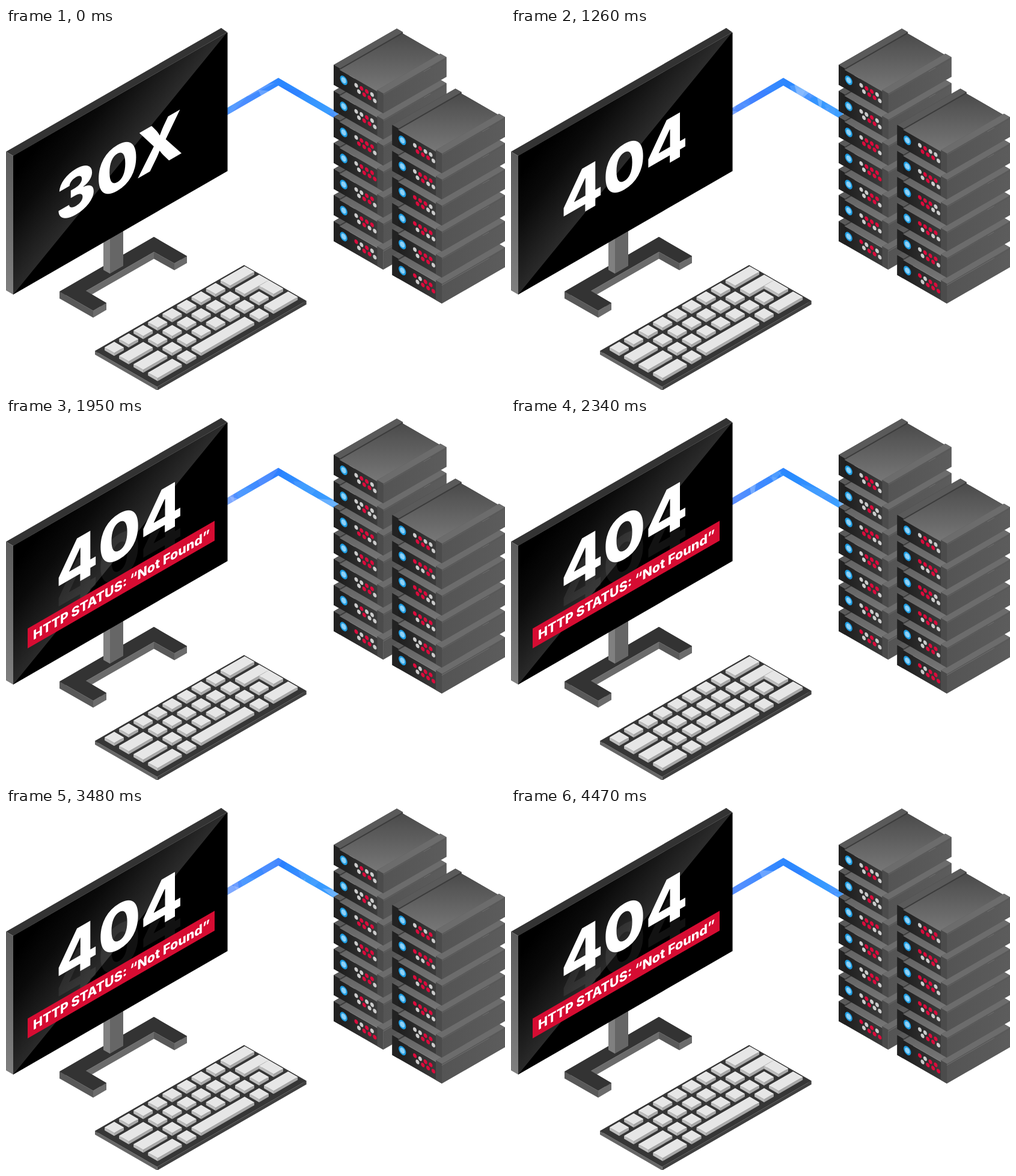
An HTML page that plays this animation: 830x603 px, repeating every 4.5 s.

```html
<!DOCTYPE html>
<html lang="en">
<head>
<meta charset="utf-8">
<title>404 Not Found</title>
<style>
  html, body { margin: 0; width: 100%; height: 100%; overflow: hidden; background: #fff; }
  svg { display: block; width: 830px; height: 603px; }
  text { font-family: Inter, "Open Sans", sans-serif; fill: #fff; }
  .digits { font-size: 102px; font-weight: 850; }
  .status { font-size: 21.4px; font-weight: 800; }
</style>
</head>
<body>
<svg viewBox="0 0 830 603">
  <defs>
    <linearGradient id="glare" gradientUnits="userSpaceOnUse" x1="90" y1="150" x2="190" y2="230">
      <stop stop-color="#000"/><stop offset=".35" stop-color="#0a0a0a"/><stop offset="1" stop-color="#2c2c2c"/>
    </linearGradient>
    <linearGradient id="edge" x2="0" y2="1"><stop stop-color="#5c5c5c"/><stop offset="1" stop-color="#808080"/></linearGradient>
    <linearGradient id="top" x2="0" y2="1"><stop stop-color="#484848"/><stop offset="1" stop-color="#7a7a7a"/></linearGradient>
    <linearGradient id="front"><stop stop-color="#191919"/><stop offset="1" stop-color="#404040"/></linearGradient>
    <linearGradient id="side"><stop stop-color="#545454"/><stop offset="1" stop-color="#5c5c5c"/></linearGradient>
    <linearGradient id="blue"><stop stop-color="#5a90ff"/><stop offset=".5" stop-color="#2a86ff"/><stop offset="1" stop-color="#3fa2ff"/></linearGradient>
    <clipPath id="cable"><path d="M368 133L453 83L556 143V156L453 96L368 145Z"/></clipPath>
    <clipPath id="wipe"><rect id="wipeBox" x="36" y="360" height="60"/></clipPath>
  </defs>

  <g clip-path="url(#cable)">
    <rect x="368" y="80" width="184" height="80" fill="url(#blue)"/>
    <g id="facets"></g>
  </g>
  <g id="scene"></g>
  <g transform="matrix(1 -.577 0 1 0 0)">
    <text id="ghost" class="digits" x="83" y="377">404</text>
    <text id="digits" class="digits" x="83"></text>
    <g clip-path="url(#wipe)">
      <rect x="36" y="371.5" width="311" height="33" fill="#d60c32"/>
      <text class="status" x="45" y="396">HTTP STATUS: “Not Found”</text>
    </g>
  </g>
</svg>
<script>
const LOOP = 4500, TILE = 400, SLOPE = .577;
const $ = id => document.getElementById(id);
let seed = 7;
const random = () => (seed = seed * 16807 % 2147483647) / 2147483647;

const poly = (points, fill) => `<polygon points="${points.join(' ')}" fill="${fill}"/>`;

// Floor parallelogram: a runs up to the right, b down to the right
const tile = (x, y, a, b) =>
  [[0, 0], [a, 0], [a, b], [0, b]].map(([u, v]) => [x + u + v, y + SLOPE * (v - u)]);

// Upright panel whose top edge runs w to the right, dropping by slope
const panel = (x, y, w, slope, h, fill) =>
  poly([[x, y], [x + w, y + w * slope], [x + w, y + w * slope + h], [x, y + h]], fill);

// Isometric solid: walls below every edge, then the top face
function extrude(points, depth, left, right, top) {
  const walls = points.map((a, i) => {
    const b = points[(i + 1) % points.length];
    const fill = (b[1] - a[1]) * (b[0] - a[0]) > 0 ? left : right;
    return poly([a, b, [b[0], b[1] + depth], [a[0], a[1] + depth]], fill);
  });
  return walls.join('') + poly(points, top);
}

function monitor() {
  const foot = [[89, 439], [246, 348], [301, 380], [280, 392], [246, 373], [133, 438], [167, 458], [145, 471]];
  return extrude(foot, 11.5, '#595959', '#6b6b6b', '#333') +
    panel(162, 340, 11, SLOPE, 63, '#808080') +
    panel(173, 341, 22, -SLOPE, 68, '#666') +
    poly([[0, 206], [358, 0], [368, 7], [12, 213]], '#333') +
    panel(0, 206, 12, SLOPE, 231, 'url(#edge)') +
    panel(12, 213, 356.5, -SLOPE, 231, '#000') +
    poly([[12, 213], [368, 7], [12, 444]], 'url(#glare)');
}

function keyboard() {
  const pitch = 24.1, half = .33;
  const key = (col, row, toCol = col, toRow = row) => {
    const u = col - half, v = row - half;
    const cap = tile(180 + pitch * (u + v), 532 - 14 * (u - v),
      pitch * (toCol - col + 2 * half), pitch * (toRow - row + 2 * half));
    return extrude(cap, 5, '#bdbdbd', '#a8a8a8', '#e6e6e6');
  };
  let out = extrude(tile(148, 538, 248, 103.5), 6, '#666', '#404040', '#363636');
  for (let row = 0; row < 4; row++) {
    const wide = row > 0;
    if (wide) out += key(0, row, 1);
    for (let col = wide ? 2 : 0; col < 8; col++)
      if (row < 3 || col < 3 || col > 6) out += key(col, row);
    if (row !== 2) out += key(8, row, 9);
  }
  return out + key(8, 2) + key(9, 2 - half, 9, 2) + key(3, 3, 6);
}

const disc = (x, y, r, fill, attr = '') =>
  `<circle r="${r}" fill="${fill}" ${attr} transform="matrix(.866 .5 0 1 ${x} ${y})"/>`;

function server(x, y) {
  const length = 105, width = 82.5, rail = 10, lip = 2.5;
  const far = width - rail;
  let out = extrude(tile(x, y + lip, length, width), 30.5, 'url(#front)', 'url(#side)', 'url(#top)') +
    extrude(tile(x, y, length, rail), lip, '#262626', '#3c3c3c', '#5a5a5a') +
    extrude(tile(x + far, y + far * SLOPE, length, rail), lip, '#4b4b4b', '#595959', '#6c6c6c') +
    panel(x, y, rail, SLOPE, 33, '#222') +
    panel(x + far, y + far * SLOPE, rail, SLOPE, 33, '#4b4b4b') +
    disc(x + 16.7, y + 25.6, 7.1, '#1c9be0') + disc(x + 16.7, y + 25.6, 4.6, '#8ed2f8');
  for (let row = 0; row < 2; row++)
    for (let col = 0; col < 4; col++)
      out += disc(x + 37.5 + row * 4.5 + col * 8.8, y + 34 + row * 10.5 + col * 5.1, 3.5, '#ccc', 'class="led"');
  return out;
}

function rack(x, y, count) {
  let out = '';
  for (let i = count - 1; i >= 0; i--) out += server(x, y + i * 43.4);
  return out;
}

// Shards drifting along the cable, repeated so the strip wraps
function shard() {
  const x = 368 + random() * TILE, y = 80 + random() * 70;
  const fill = `hsl(${205 + random() * 25} 100% ${55 + random() * 40}%)`;
  const points = [[x, y], [x + 10 + random() * 40, y + random() * 30 - 15], [x + random() * 20, y + 15 + random() * 25]];
  const copies = [-1, 0].map(n => poly(points.map(([px, py]) => [px + n * TILE, py]), fill));
  return `<g opacity="${.1 + random() * .25}">${copies.join('')}</g>`;
}

$('scene').innerHTML = monitor() + keyboard() + rack(545, 61.5, 7) + rack(642.5, 161.5, 6);
$('facets').innerHTML = Array.from({ length: 50 }, shard).join('');

// Lamps near the middle of a panel are mostly red; a few toggle once
const lamps = [...document.querySelectorAll('.led')].map((led, i) => {
  const offset = Math.abs(i % 4 + (i % 8 > 3 ? .5 : 0) - 1.75);
  const lit = random() < 1.05 - .42 * offset;
  const toggle = random() < .2 ? (random() < .7 ? 1500 : 3450) : LOOP;
  return { led, lit, toggle };
});

const POOL = '30XO174';
const ease = (t, from, to) => {
  const p = Math.min(1, Math.max(0, (t - from) / (to - from)));
  return 1 - (1 - p) ** 3;
};

function draw() {
  const t = performance.now() % LOOP;
  $('facets').setAttribute('transform', `translate(${t / LOOP * 3 * TILE % TILE})`);

  const step = Math.floor((t + 5) / 60);
  $('digits').textContent = [...'404'].map((digit, i) =>
    t >= 570 + 330 * i ? digit : POOL[(step * 5 + i) % POOL.length]).join('');
  const rise = ease(t, 1270, 1530);
  $('digits').setAttribute('y', 377 - 34 * rise);
  $('ghost').setAttribute('opacity', .07 * rise);
  $('wipeBox').setAttribute('width', 311 * ease(t, 1290, 1550));

  for (const { led, lit, toggle } of lamps)
    led.setAttribute('fill', lit !== t >= toggle ? '#dc0b3c' : '#ccc');
  requestAnimationFrame(draw);
}
draw();
</script>
</body>
</html>
```
